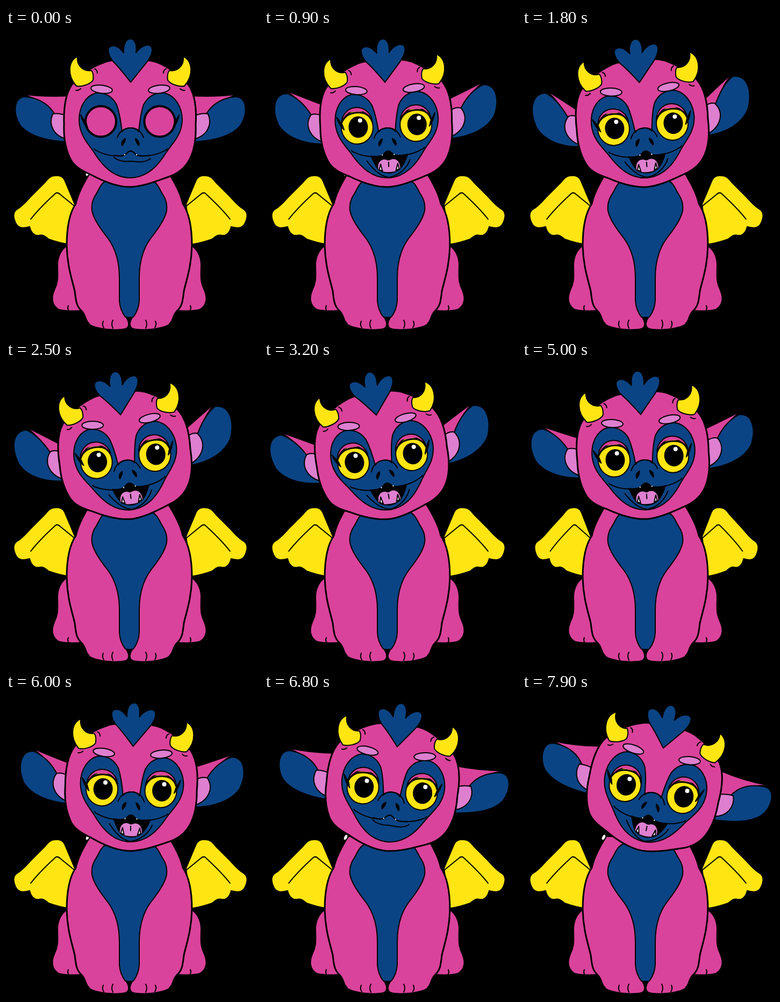
An HTML page that plays this animation: 469 px wide and 566 px high, repeating every 8000 ms.

```html
<!DOCTYPE html>
<html lang="en">
<head>
<meta charset="utf-8">
<title>Little dragon</title>
<style>
  html, body { margin: 0; width: 100%; height: 100%; overflow: hidden; background: #000; }
  svg { display: block; width: 100%; height: 100%; stroke-linecap: round; stroke-linejoin: round; }
  .line { fill: none; stroke: #000; stroke-width: 2; }
  .pink { fill: #da439b; }
  .blue { fill: #0b4484; }
  .gold { fill: #ffe512; }
  .rose { fill: #de7fd0; }
  .ink { stroke: #000; stroke-width: 2; }
  .bold { stroke: #000; stroke-width: 3; }
</style>
</head>
<body>
<svg viewBox="0 0 469 566">
  <defs>
    <clipPath id="gape"><path id="gapePath"/></clipPath>
    <clipPath id="lid"><rect id="lidRect" x="-60" width="120" height="90"/></clipPath>
  </defs>

  <!-- wings -->
  <g id="wing">
    <path class="gold ink" d="M128 328 L109 283 C105 275 98 274 91 275 C82 275 78 281 72 288 L45 315 C36 325 30 332 20 338 C13 343 13 352 18 363 C23 374 33 373 44 370 C46 381 54 388 62 386 C67 384 72 387 79 393 C90 397 104 401 118 403Z"/>
    <path class="line" d="M46 356 C60 338 80 319 92 308 Q96 305 101 310 L128 332"/>
  </g>
  <use href="#wing" transform="matrix(-1 0 0 1 463 0)"/>

  <!-- body -->
  <path class="blue" d="M160 280 H299 V400 L252 440 V530 Q230 546 207 530 V440 L160 400Z"/>
  <g id="half">
    <path class="pink ink" d="M120 402 C104 408 95 425 96 445 C97 468 96 476 90 488 C84 502 85 516 98 524 C112 528 130 527 144 526Z"/>
    <path class="line" d="M116 517 Q114 521 116 525"/>
    <path class="pink" d="M156 270 C146 286 134 308 130 327 C117 346 113 375 113 405 C114 445 123 468 128 490 C130 508 131 518 141 527 C149 535 148 547 154 550 C168 560 206 563 222 559 C229 556 229 548 222 538 C213 526 211 515 211 505 V465 C211 432 203 410 190 392 C176 374 163 356 160 340 C159 332 160 322 166 312 C174 300 176 288 190 282 V270Z"/>
    <path class="line" d="M222 538 C213 526 211 515 211 505 V465 C211 432 203 410 190 392 C176 374 163 356 160 340 C159 332 160 322 166 312 C174 300 176 288 190 282"/>
    <path class="bold" fill="none" d="M156 270 C146 286 134 308 130 327 C117 346 113 375 113 405 C114 445 123 468 128 490 C130 508 131 518 141 527 C149 535 148 547 154 550"/>
    <path class="line" d="M181 546 Q178 552 182 558 M199 544 Q195 551 199 559"/>
  </g>
  <use href="#half" transform="matrix(-1 0 0 1 459 0)"/>
  <ellipse fill="#fff" cx="152" cy="270.5" rx="2.6" ry="5" transform="rotate(25 152 270.5)"/>

  <!-- head -->
  <g id="head">
    <g id="ear">
      <path class="pink ink" id="earBack"/>
      <path class="blue ink" id="earLeaf"/>
      <path class="rose ink" id="earInner"/>
    </g>
    <use href="#ear" transform="matrix(-1 0 0 1 463 0)"/>

    <path class="pink bold" d="M232 68 C218 58 196 58 180 65 C160 72 138 87 123 105 C111 122 107 150 108 180 C107 205 112 228 120 244 C127 258 142 266 158 273 C180 285 205 296 231 296 C257 295 283 284 303 277 C320 271 334 260 342 244 C350 228 354 205 353 180 C355 150 351 122 339 105 C324 87 303 74 284 65 C266 58 246 58 232 68Z"/>

    <path class="blue ink" d="M232 186 C225 186 220 188 216 193 C214 175 212 160 206 143 C198 127 184 120 168 121 C148 126 136 147 136 172 C137 200 152 214 164 232 C180 257 200 279 232 279 C262 278 282 258 298 232 C310 214 327 200 328 172 C328 147 315 126 295 121 C278 120 264 127 256 143 C250 160 249 175 247 193 C243 188 238 186 232 186Z"/>

    <g id="eyes"></g>
    <path d="M139 162 Q143 177 152 186 L149 176Z M322 162 Q319 177 311 186 L314 176Z" class="ink"/>

    <path class="line" d="M207 204 C211 193 220 186 232 186 C244 186 252 193 256 204"/>
    <path d="M222 206 C217 208 214 214 216 219 C219 215 222 212 222 206Z M241 206 C246 208 249 214 247 219 C244 215 241 212 241 206Z" class="ink"/>

    <path id="lip" class="line"/>
    <path id="mouth" class="ink"/>
    <g clip-path="url(#gape)">
      <g id="tongue">
        <path class="rose" d="M212 262 C211 249 219 242 228 245 Q232 248 237 245 C246 242 254 250 253 262 C248 270 219 271 212 262Z"/>
        <path class="line" d="M232 250 V258"/>
        <path class="ink" fill="#fff" stroke-width="1" d="M214 263 L217 253 L220 266Z M251 263 L249 253 L245 266Z"/>
      </g>
    </g>
    <path class="line" d="M164 225 Q166 228 170 229 C182 236 210 242 222 236 Q228 229 232 229 Q236 229 242 236 C254 242 282 236 294 229 Q298 228 300 225"/>
    <path fill="#fff" d="M220 235h2v2h-2z M242 235h2v2h-2z"/>

    <g id="horn">
      <path class="gold ink" d="M133 53 C116 61 113 88 131 108 C140 110 157 105 162 97 C163 90 162 83 159 79 C145 82 131 71 133 53Z"/>
      <path class="line" d="M165 76 Q170 78 170 84 M130 116 Q135 117 139 113"/>
      <ellipse class="rose ink" cx="178" cy="114" rx="20" ry="7.5" transform="rotate(7 178 114)"/>
    </g>
    <use href="#horn" transform="matrix(-1 0 0 1 463 0)"/>
    <path class="blue ink" d="M232 101 C222 88 211 74 200 63 C192 54 188 42 192 36 C201 29 211 36 219 46 C218 31 223 20 232 20 C240 21 244 31 242 46 C250 35 263 28 270 34 C276 42 268 56 261 65 C251 77 241 90 232 101Z"/>
  </g>
</svg>
<script>
const $ = id => document.getElementById(id);
const LOOP = 8000;

// [time, value] keys, joined by monotone cubic curves
const TILT = [[0, 0], [1800, -5.1], [3200, -8.7], [3720, -9.3], [3820, -9.3], [5000, -4.2], [6000, 1.7], [6800, 6], [8000, 12.2]];
const LIFT = [[0, 0], [1800, 1], [3200, .75], [5000, .58], [6000, .53], [6800, -.05], [8000, -.26]];
const GAPE = [[0, 0], [200, 0], [700, 1], [6200, 1], [6700, 0], [6900, 0], [7400, 1], [8000, 1]];
const BLINK = [[0, 1], [100, .8], [300, 0], [8000, 0]];

// resting and raised ear, closed and open mouth
const EAR = {
  earBack: ["M29 123 C58 127 90 128 122 126 L122 210 L88 160 C70 138 50 129 29 123Z",
            "M54 97 C76 113 97 130 122 150 L122 210 L94 158 C85 135 73 114 54 97Z"],
  earLeaf: ["M36 128 C14 128 12 160 27 182 C45 203 80 210 112 212 C105 190 95 166 87 155 C76 140 58 130 36 128Z",
            "M57 105 C29 104 23 135 34 168 C46 192 75 208 112 210 C106 190 98 168 93 152 C85 136 75 118 57 105Z"],
  earInner: ["M87 160 C79 178 86 202 118 208 L118 165 C105 160 95 158 87 160Z",
             "M95 152 C79 168 84 197 118 210 L118 160 C110 153 104 149 95 152Z"]
};
const MOUTH = {
  mouth: ["M202 237 C212 239 218 238 222 236 Q228 229 232 229 Q236 229 242 236 C246 238 254 239 268 237 C254 239 246 238 242 236 Q236 229 232 229 Q228 229 222 236 C218 238 212 239 202 237Z",
          "M200 237 C212 239 218 238 222 236 Q228 229 232 229 Q236 229 242 236 C246 238 254 239 268 237 C264 248 258 259 250 265 Q241 270 232 270 Q222 269 215 265 C207 258 205 248 200 237Z"],
  lip: ["M201 241 C210 249 222 249 232 248 C242 249 258 252 269 243",
        "M192 246 C200 258 214 276 232 278 C250 276 266 262 272 247"]
};

function curve(keys, t) {
  const last = keys.length - 1;
  let i = 0;
  while (i < last - 1 && t >= keys[i + 1][0]) i++;
  const rise = j => (keys[j + 1][1] - keys[j][1]) / (keys[j + 1][0] - keys[j][0]);
  const slope = j => {
    if (j === 0) return rise(0);
    if (j === last) return rise(last - 1);
    const a = rise(j - 1), b = rise(j);
    return a * b <= 0 ? 0 : 2 * a * b / (a + b);
  };
  const [t0, a] = keys[i], [t1, b] = keys[i + 1];
  const d = t1 - t0, u = (t - t0) / d, v = 1 - u;
  return v * v * ((1 + 2 * u) * a + u * d * slope(i)) + u * u * ((1 + 2 * v) * b - v * d * slope(i + 1));
}

function mix([a, b], k) {
  const ends = b.match(/[\d.]+/g);
  let i = 0;
  return a.replace(/[\d.]+/g, n => (+n + (ends[i++] - n) * k).toFixed(2));
}

const eye = x => `<g transform="translate(${x})">
  <ellipse class="pink lid" stroke="#000" cy="174" rx="28.5" ry="28.5"/>
  <g clip-path="url(#lid)">
    <ellipse class="gold ink" cy="182.5" rx="29.5" ry="31"/>
    <ellipse cx="2" cy="182" rx="18" ry="20"/>
    <circle fill="#fff" cx="6" cy="170" r="4"/>
    <path class="bold" fill="none" d="M-28 172 C-22 159 -10 155 2 155 C14 155 24 160 28 172"/>
  </g></g>`;
$("eyes").innerHTML = eye(176.5) + eye(286);
const lids = document.querySelectorAll(".lid");

function draw(t) {
  $("head").setAttribute("transform", `rotate(${curve(TILT, t)} 231 253)`);

  const lift = curve(LIFT, t), gape = curve(GAPE, t), blink = curve(BLINK, t);
  for (const id in EAR) $(id).setAttribute("d", mix(EAR[id], lift));
  for (const id in MOUTH) $(id).setAttribute("d", mix(MOUTH[id], gape));
  $("gapePath").setAttribute("d", mix(MOUTH.mouth, gape));
  $("tongue").setAttribute("transform", `translate(0 ${-14 * (1 - gape)})`);
  $("tongue").style.display = gape < .05 ? "none" : "";
  $("lidRect").setAttribute("y", 153.5 + 65 * blink);
  for (const lid of lids) lid.setAttribute("stroke-width", 2 + 2 * blink);

  const flap = Math.min(1, Math.max(0, (t - 4800) / 1000));
  const wide = 1 - .14 * Math.sin(Math.PI * flap);
  $("wing").setAttribute("transform", `translate(${125 * (1 - wide)}) scale(${wide} 1)`);
}

function tick() {
  draw(performance.now() % LOOP);
  requestAnimationFrame(tick);
}
tick();
</script>
</body>
</html>
```
